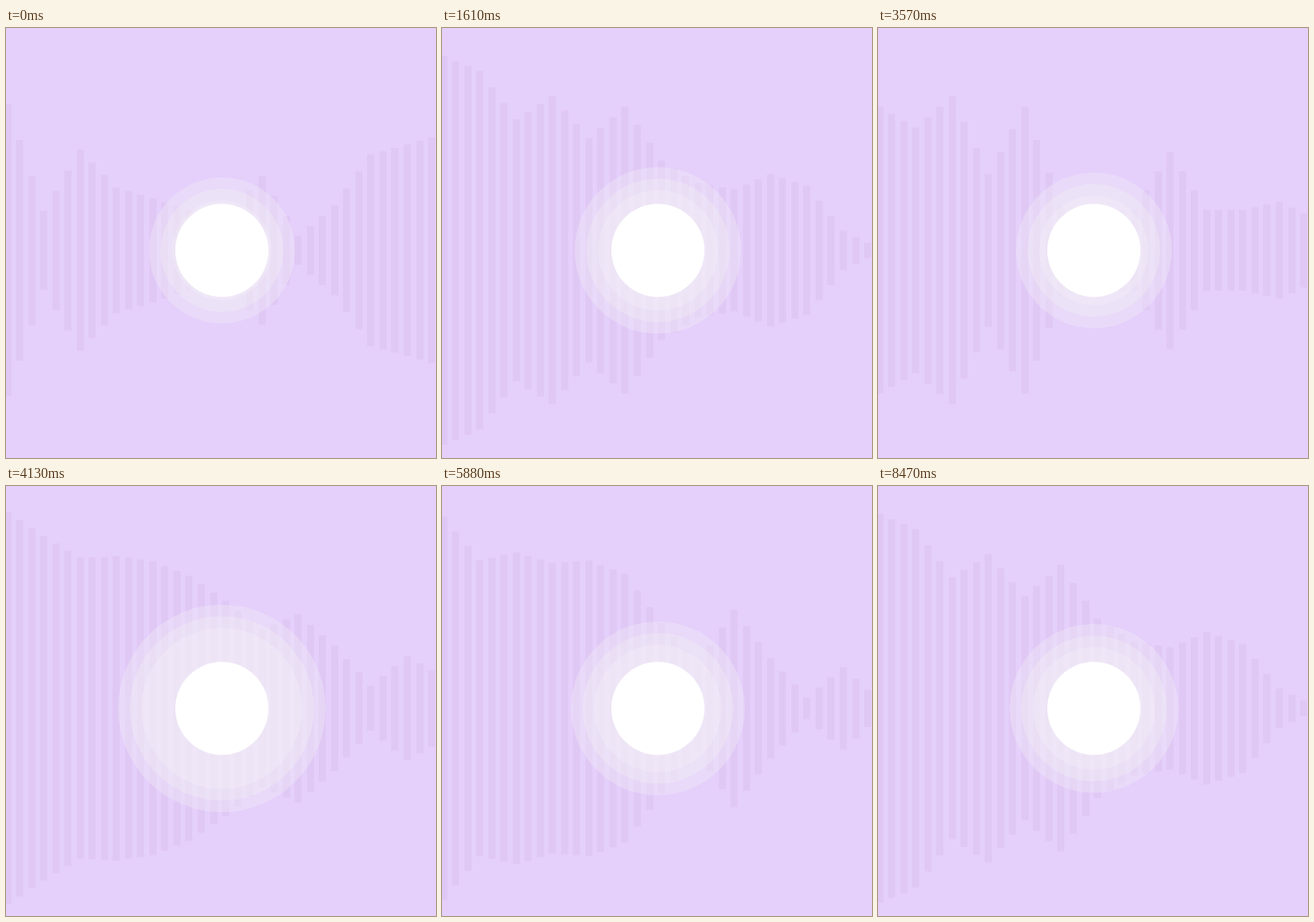
Recreate the animation shown at these times as an HTML page with a canvas. Size 480 px wide and 480 px high, loop 8610 ms.

```html
<!DOCTYPE html>
<html lang="en">
<head>
<meta charset="utf-8">
<title>Voice pulse</title>
<style>
  html, body { margin: 0; height: 100%; overflow: hidden; background: #e5cffb; }
  canvas { display: block; }
</style>
</head>
<body>
<canvas width="480" height="480"></canvas>
<script>
const ctx = document.querySelector('canvas').getContext('2d');
const LOOP = 8610, STEP = 70, HOLD = 1330;
const BARS = 36, PITCH = 13.53, CX = 241, CY = 248.25;

// Outlines of the sound: half the bar height at every third bar.
const outlines = [
  [163, 44, 112, 70, 58, 45, 35, 83, 16, 50, 107, 118, 130],
  [217, 200, 146, 172, 125, 160, 100, 75, 68, 85, 72, 22, 2],
  [160, 137, 172, 85, 160, 50, 45, 45, 110, 45, 45, 54, 35],
  [219, 192, 168, 170, 164, 148, 120, 88, 105, 70, 25, 58, 35],
  [214, 165, 174, 162, 165, 150, 95, 50, 110, 56, 12, 46, 8],
  [206, 165, 150, 105, 105, 135, 70, 45, 90, 20, 16, 55, 10]
];

// Moments at which the rings start to swell.
const swells = [0, 1475, 2200, 3700, 4690, 5700, 6710, 7720], SWELL = 900;

function barHeight(outline, bar) {
  const k = Math.floor(bar / 3), u = bar / 3 - k;
  return outline[k] * (1 - u) + outline[k + 1] * u;
}

function radiusAt(t) {
  const rest = Math.min(87, 81.5 + t / 150);
  const lifts = swells.map(s => {
    const u = (t - s) / SWELL;
    return u > 0 && u < 1 ? Math.sin(Math.PI * u) ** 2 : 0;
  });
  return rest + 29 * Math.max(...lifts);
}

function disc(r, color) {
  ctx.fillStyle = color;
  ctx.beginPath();
  ctx.arc(CX, CY, r, 0, Math.PI * 2);
  ctx.fill();
}

function draw(now) {
  const t = Math.floor(now % LOOP / STEP) * STEP;
  ctx.fillStyle = '#e5cffb';
  ctx.fillRect(0, 0, 480, 480);

  // The second outline comes back at the end of the loop.
  const outline = outlines[Math.floor((t + 280) / HOLD)] || outlines[1];
  ctx.fillStyle = '#e0c8f5';
  for (let i = 0; i < BARS; i++) {
    const h = barHeight(outline, i);
    ctx.fillRect(Math.round(PITCH * i - 2.5), CY - h, 8, 2 * h);
  }

  const r = radiusAt(t);
  for (const inset of [0, 13, 26]) disc(r - inset, 'rgba(245, 245, 245, .28)');
  disc(52, '#fff');
}

const start = performance.now();
function tick() {
  draw(performance.now() - start);
  requestAnimationFrame(tick);
}
tick();
</script>
</body>
</html>
```
